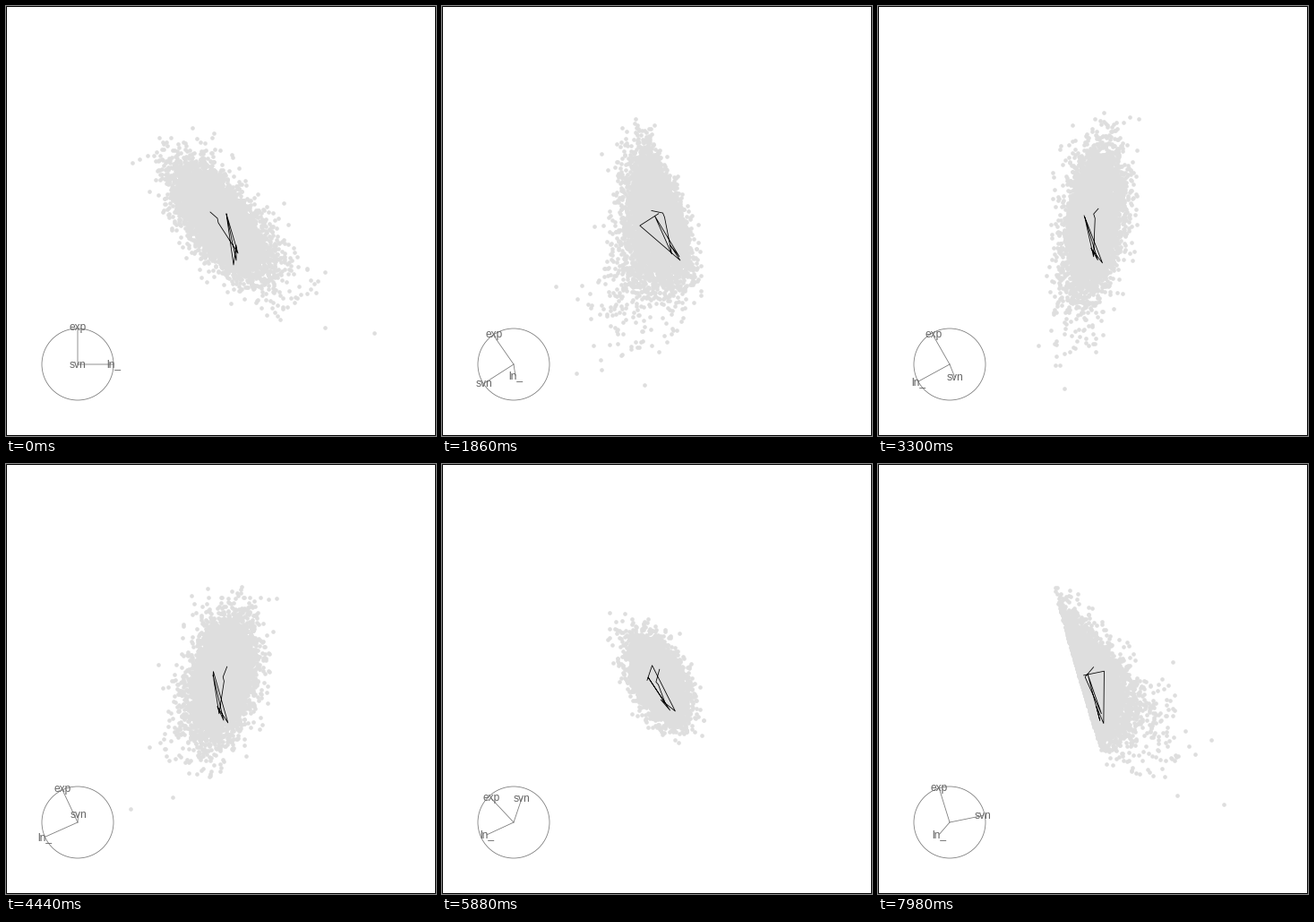
Write a matplotlib script that moves like this. It is 480 px wide and 480 px high and loops after 8 s.

```python
import numpy as np
import matplotlib.pyplot as plt
from matplotlib.animation import FuncAnimation
from matplotlib.patches import Circle, Rectangle

SIZE, DPI = 480, 100
PX = 72 / DPI            # points per pixel
TICK, LOOP, HOLD = 20, 8000, 60
CENTER = 240
HUB, RADIUS = (80, 400), 40

# The tour turns the viewing direction along great circles between these
# stops: time in s, then the direction in (exp, svn, ln_).
STOPS = np.array([
    (0.00, 0, 1, 0),
    (0.84, .47, .71, .52),
    (1.86, .28, -.13, .95),
    (3.50, -.43, -.885, -.15),
    (5.18, .62, -.77, -.03),
    (5.88, .42, -.71, -.56),
    (6.45, -.05, -.92, -.40),
    (7.27, -.73, -.54, -.41),
    (7.98, -.25, -.36, -.90),
])

# one subject's path through (exp, svn, ln_): a slow start, then jumps
# between a high and a low level
TRACE = np.array([
    (10, 0, -12), (3, -10, -4), (-2, -9, -3), (-36, 5, 19), (8, -2, 6),
    (-44, 0, 17), (-27, 1, 17), (-49, 2, 14), (8, 18, 6), (8, -7, 6),
])


def make_cloud(n=6400):
    """A one-sided exponential factor bends two normal ones along with it."""
    rng = np.random.default_rng(7)
    w = 14 * (np.minimum(rng.exponential(size=n), 8.8) - 1)
    z1, z2 = np.clip(rng.normal(size=(2, n)), -3.2, 3.2)
    bend = 0.005 * w ** 2 - 1
    t = 0.6 * w + bend + 32 * z1
    m = 0.85 * w + bend + 10 * z1 + 17 * z2
    axes = np.array([(-.02, .93, -.354), (-.97, .08, .235), (.25, .36, .93)])
    return np.column_stack([w, t, m]) @ axes


def turn(axis, angle):
    x, y, z = axis
    k = np.array([(0, -z, y), (z, 0, -x), (-y, x, 0)])
    return np.eye(3) + np.sin(angle) * k + (1 - np.cos(angle)) * k @ k


def plan_tour():
    """Legs as (start plane, axis, angle); the plane never spins in itself."""
    views = STOPS[:, 1:] / np.linalg.norm(STOPS[:, 1:], axis=1)[:, None]
    plane = np.array([(0, 1), (0, 0), (1, 0)], float)
    legs = []
    for a, b in zip(views, views[1:]):
        axis = np.cross(a, b)
        angle = np.arctan2(np.linalg.norm(axis), a @ b)
        axis /= np.linalg.norm(axis)
        legs.append((plane, axis, angle))
        plane = turn(axis, angle) @ plane
    return legs


TIMES = STOPS[:, 0]
LEGS = plan_tour()


def projection(t):
    i = min(np.searchsorted(TIMES, t, side="right") - 1, len(LEGS) - 1)
    part = (t - TIMES[i]) / (TIMES[i + 1] - TIMES[i])
    plane, axis, angle = LEGS[i]
    return turn(axis, angle * part) @ plane


def to_screen(data, proj):
    p = data @ proj
    return CENTER + p[:, 0], CENTER - p[:, 1]


fig = plt.figure(figsize=(SIZE / DPI, SIZE / DPI), dpi=DPI, facecolor="white")
ax = fig.add_axes([0, 0, 1, 1])
ax.set_xlim(0, SIZE)
ax.set_ylim(SIZE, 0)
ax.axis("off")

GREY = "#7a7a7a"
THIN = 0.8 * PX
ax.add_patch(Rectangle((.5, .5), SIZE - 1, SIZE - 1, fill=False, ec="black",
                       lw=PX, snap=False))
ax.add_patch(Circle(HUB, RADIUS, fill=False, ec=GREY, lw=THIN))
spokes = [ax.plot([], [], color=GREY, lw=THIN, snap=False)[0] for _ in range(3)]
# label and its baseline drop below the axis tip
LABELS = [("exp", 2), ("svn", 3.5), ("ln_", 3.5)]
labels = [ax.text(0, 0, s, family="Liberation Sans", size=12 * PX, color="#666666",
                  ha="center", va="baseline") for s, _ in LABELS]

cloud = make_cloud()
dots, = ax.plot([], [], "o", ms=4.6 * PX, mew=0, color="#dedede")
trace, = ax.plot([], [], color="black", lw=THIN, solid_joinstyle="round")


def draw(i):
    t = i * TICK // HOLD * HOLD / 1000
    proj = projection(t)
    dots.set_data(*to_screen(cloud, proj))
    trace.set_data(*to_screen(TRACE, proj))
    for spoke, label, (_, drop), (x, y) in zip(spokes, labels, LABELS, proj):
        tip = HUB[0] + RADIUS * x, HUB[1] - RADIUS * y
        spoke.set_data([HUB[0], tip[0]], [HUB[1], tip[1]])
        label.set_position((tip[0], tip[1] + drop))
    return [dots, trace, *spokes, *labels]


anim = FuncAnimation(fig, draw, frames=LOOP // TICK, interval=TICK,
                     repeat=True, repeat_delay=0, blit=False)
plt.show()
```
